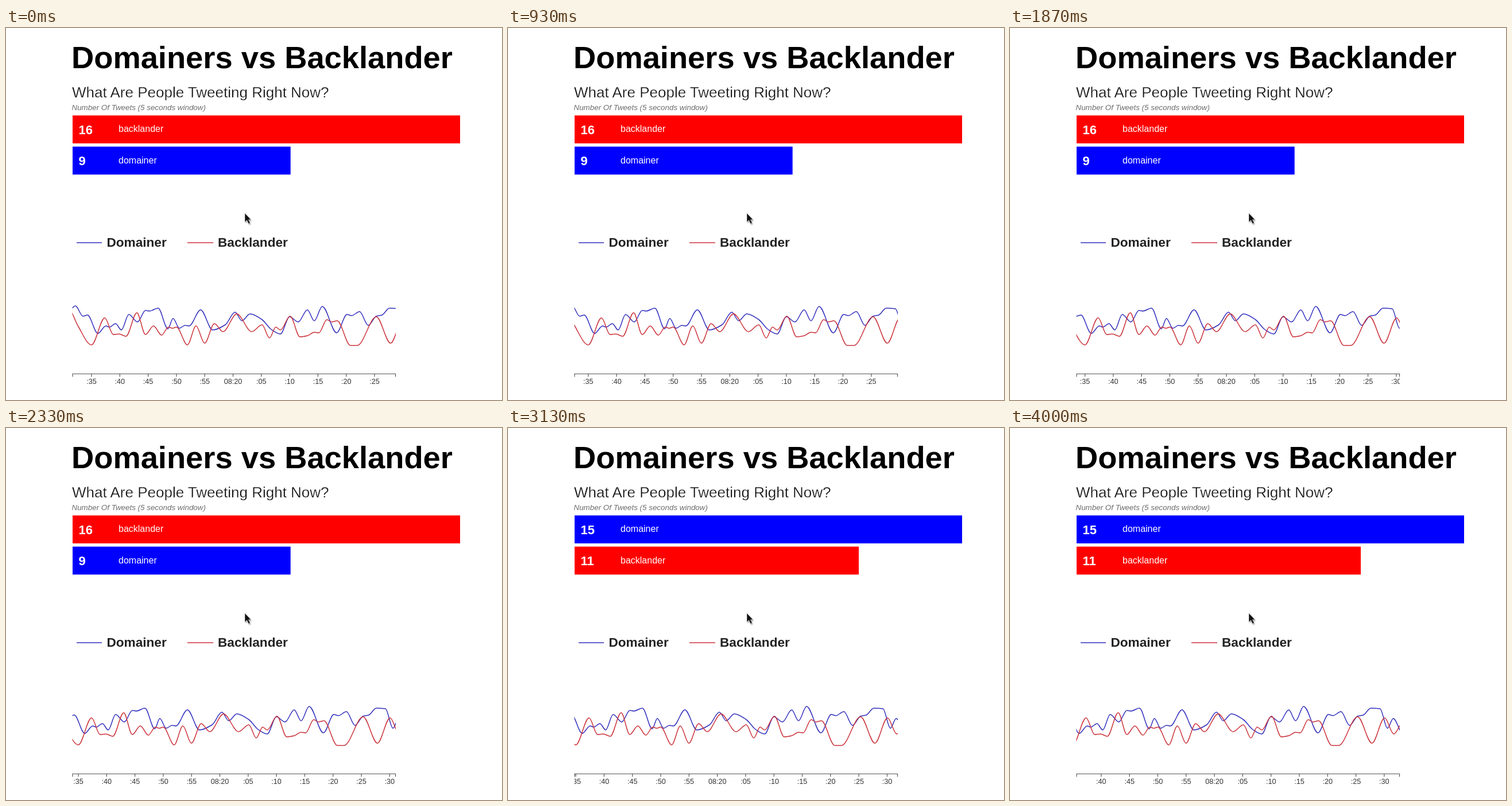
Recreate the animation shown at these times as an HTML page. Size 864 by 648 pixels, loop 4.07 s.

```html
<!DOCTYPE html>
<html lang="en">
<head>
<meta charset="utf-8">
<title>Live comparison chart</title>
<style>
  html, body { margin: 0; width: 100%; height: 100%; overflow: hidden; background: #fff; }
  svg { display: block; width: 864px; height: 648px; font-family: "Liberation Sans", Arial, sans-serif; }
  .bold { font-weight: bold; }
  .line { fill: none; stroke-width: 1.5; stroke-linejoin: round; }
  .blue { stroke: #3431bd; }
  .red { stroke: #cb343c; }
  .axis { fill: none; stroke: #555; stroke-width: 1.2; }
</style>
</head>
<body>
<svg viewBox="0 0 864 648" xmlns="http://www.w3.org/2000/svg">
  <defs>
    <clipPath id="plot"><rect x="115.5" y="440" width="563.5" height="200"/></clipPath>
    <filter id="soft" x="-50%" y="-50%" width="200%" height="200%"><feGaussianBlur stdDeviation="1.3"/></filter>
  </defs>
  <rect width="864" height="648" fill="#fff"/>

  <text class="bold" x="114" y="69.5" font-size="54.3">Domainers vs Backlander</text>
  <text x="115" y="120.5" font-size="26" fill="#111" stroke="#fff" stroke-width=".35">What Are People Tweeting Right Now?</text>
  <text x="114.5" y="143" font-size="13.4" font-style="italic" fill="#6c6c6c">Number Of Tweets (5 seconds window)</text>

  <g id="bars" fill="#fff"></g>

  <path d="M417 325v15l3.500-3 3 6 3-1-2.500-6h4.500z" fill="#000" opacity=".4" filter="url(#soft)"/>
  <path d="M416 322.500v15.500l3.700-3.200 2.800 6.200 2.700-1.200-2.700-6h4.300z" fill="#111" stroke="#fff" stroke-width=".5"/>

  <g class="bold" font-size="22.600" fill="#222">
    <path class="line blue" d="M123 374H167"/>
    <text x="175.500" y="381">Domainer</text>
    <path class="line red" d="M316 374H361"/>
    <text x="369" y="381">Backlander</text>
  </g>

  <g clip-path="url(#plot)">
    <g id="lines"></g>
    <g id="ticks" font-size="12.600" text-anchor="middle" fill="#333"></g>
  </g>
  <path class="axis" d="M116 607.500V602.500H678.500V607.500"/>
</svg>
<script>
const LOOP = 4070;
const SPEED = 9.86;             // pixels per second
const LEFT = 116, RIGHT = 679;
const TOP_ROW = 152.3, ROW_STEP = 54.3;
const FULL_WIDTH = 675;
const SWAP_START = 2552, SWAP_TIME = 500;

const SVG_NS = "http://www.w3.org/2000/svg";
const byId = id => document.getElementById(id);
const clamp = v => Math.max(0, Math.min(1, v));
const easeInOut = p => p < 0.5 ? 4 * p ** 3 : 1 - 4 * (1 - p) ** 3;

function add(parent, tag, attrs, text = "") {
  const node = document.createElementNS(SVG_NS, tag);
  for (const key in attrs) node.setAttribute(key, attrs[key]);
  node.textContent = text;
  parent.append(node);
  return node;
}

// Turning points of each series, joined by a monotone cubic.
const blueTurns = "115,488 121,484 134,502 142,500 160,532 174,519 180,521 191,515 201,526 " +
  "214,499 229,512 243,492 250,493 265,488 282,524 291,506 302,523 312,518 319,519 339,491 " +
  "360,526 382,517 399,495 411,510 425,498 446,508 462,525 478,533 494,503 509,512 525,491 " +
  "537,510 551,485 576,531 594,499 602,501 616,494 631,518 645,502 655,500 668,488 684,489 " +
  "697,523 707,506 720,529";
const redTurns = "115,496 126,520 149,552 172,505 187,534 197,533 209,537 228,496 243,534 " +
  "257,519 271,535 283,521 290,523 297,521 316,552 331,519 346,549 363,515 378,529 402,498 " +
  "428,529 446,517 459,540 470,521 478,526 495,502 512,538 525,536 537,530 545,531 559,508 " +
  "567,512 577,510 600,553 612,553 645,503 670,549 692,505 708,533 720,516";

function smoothPath(turns) {
  const pts = turns.split(" ").map(p => p.split(",").map(Number));
  const slope = pts.slice(1).map(([x, y], i) => (y - pts[i][1]) / (x - pts[i][0]));
  const tangent = pts.map((_, i) => {
    const a = slope[i - 1] ?? slope[i], b = slope[i] ?? a;
    return a * b <= 0 ? 0 : 2 * a * b / (a + b);
  });
  let d = "M" + pts[0];
  for (let i = 1; i < pts.length; i++) {
    const [x0, y0] = pts[i - 1], [x1, y1] = pts[i], h = (x1 - x0) / 3;
    d += `C${x0 + h},${y0 + h * tangent[i - 1]} ${x1 - h},${y1 - h * tangent[i]} ${x1},${y1}`;
  }
  return d;
}

const lines = byId("lines");
add(lines, "path", { class: "line blue", d: smoothPath(blueTurns) });
add(lines, "path", { class: "line red", d: smoothPath(redTurns) });

const ticks = Array.from({ length: 12 }, (_, i) => {
  const second = (35 + i * 5) % 60;
  const node = add(byId("ticks"), "g", {});
  add(node, "path", { class: "axis", d: "M0 602V607.500" });
  add(node, "text", { y: 620 }, second ? ":" + String(second).padStart(2, "0") : "08:20");
  return { node, x: 149 + i * 5 * SPEED };
});

function makeBar(color, label, before, after, rowBefore) {
  const node = add(byId("bars"), "g", {});
  const rect = add(node, "rect", { x: LEFT, height: 48.7, fill: color });
  const count = add(node, "text", { class: "bold", x: 126.5, y: 32.7, "font-size": 22 });
  add(node, "text", { x: 196, y: 29, "font-size": 16 }, label);
  return { node, rect, count, before, after, rowBefore };
}
const bars = [
  makeBar("#00f", "domainer", 9, 15, 1),
  makeBar("#f00", "backlander", 16, 11, 0)
];

function drawBars(ms) {
  const swapped = ms >= SWAP_START;
  const progress = easeInOut(clamp((ms - SWAP_START) / SWAP_TIME));
  const value = bar => swapped ? bar.after : bar.before;
  const most = Math.max(...bars.map(value));
  for (const bar of bars) {
    const row = bar.rowBefore + (1 - 2 * bar.rowBefore) * progress;
    bar.node.setAttribute("transform", `translate(0 ${TOP_ROW + row * ROW_STEP})`);
    bar.rect.setAttribute("width", FULL_WIDTH * value(bar) / most);
    bar.count.textContent = value(bar);
  }
}

function drawChart(ms) {
  const shift = SPEED * ms / 1000;
  lines.setAttribute("transform", `translate(${-shift} 0)`);
  for (const { node, x } of ticks) {
    const pos = x - shift;
    const fadeIn = x < RIGHT ? 1 : clamp((RIGHT - pos) / SPEED / 0.4);
    const fadeOut = 1 - clamp((LEFT - pos) / SPEED / 0.4);
    node.setAttribute("transform", `translate(${pos} 0)`);
    node.setAttribute("opacity", fadeIn * fadeOut);
  }
}

const start = performance.now();
function render() {
  const ms = (performance.now() - start) % LOOP;
  drawBars(ms);
  drawChart(ms);
  requestAnimationFrame(render);
}
render();
</script>
</body>
</html>
```
